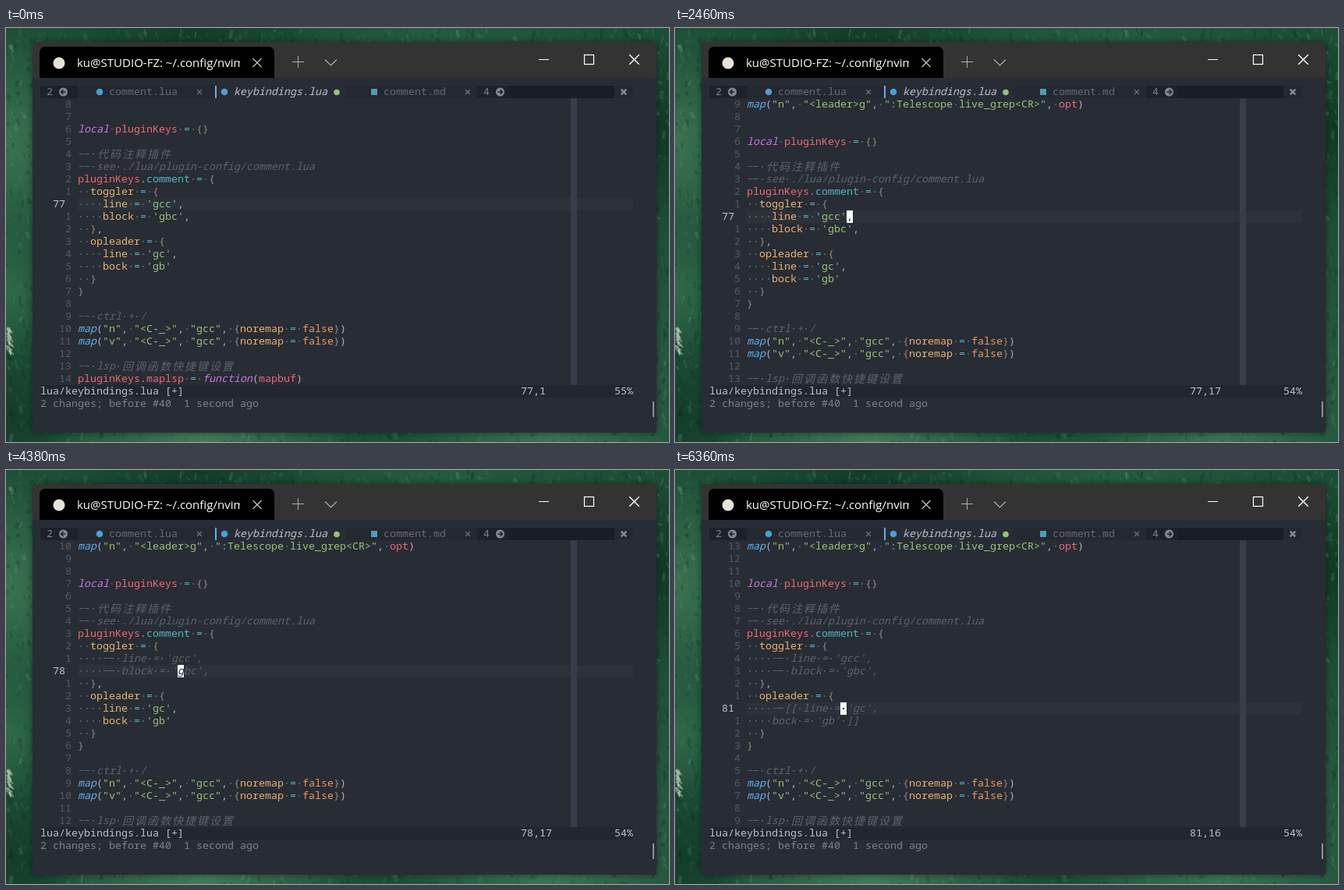
An HTML page with a canvas for the animation above (8000 ms loop, 850 px wide and 531 px high).

```html
<!DOCTYPE html>
<html lang="en">
<head>
<meta charset="utf-8">
<title>Commenting code in a terminal editor</title>
<style>
html, body { margin: 0; width: 100%; height: 100%; overflow: hidden; background: #1d4f37; }
canvas { display: block; }
</style>
</head>
<body>
<canvas id="stage" width="850" height="531"></canvas>
<script>
const W = 850, H = 531, LOOP = 8000;
const CELL = 8, ROW = 16, TEXT_X = 92, TOP = 90, ROWS = 23;
const MONO = '13.333px "Noto Sans Mono", "DejaVu Sans Mono", monospace';
const CJK = 'italic 14px "Noto Sans CJK SC", "Noto Sans CJK", sans-serif';
const C = {
  bg: '#282c34', bar: '#22262d', fill: '#1a1d23', line: '#2c313a', column: '#373d49',
  text: '#abb2bf', bright: '#bbc2cf', dim: '#7c828d', number: '#535a67',
  comment: '#5c6370', dot: '#4e5b67',
  red: '#ec6a72', green: '#98c379', blue: '#61afef', cyan: '#56b6c2',
  purple: '#c678dd', yellow: '#e8b470', orange: '#e39d60', brace: '#978879'
};

const ctx = document.getElementById('stage').getContext('2d');

// time, line, column, pending keys
const steps = [
  [0, 77, 1, ''], [900, 76, 13, ''], [2460, 77, 17, ''],
  [2820, 77, 17, 'g'], [3030, 77, 17, 'gc'], [3240, 77, 17, 'g@i'],
  [3780, 77, 17, 'g@i{'], [3810, 77, 17, ''],
  [4380, 78, 17, ''], [4500, 79, 4, ''], [4650, 80, 14, ''], [4800, 81, 16, ''],
  [5310, 81, 16, 'g'], [5520, 81, 16, 'gb'], [5730, 81, 16, 'g@i'], [6360, 81, 16, '']
];
const SCROLL_AT = 900, LINES_AT = 3810, BLOCK_AT = 6360;

const FIRST = 68;
const source = `map("n", "<leader>g", ":Telescope live_grep<CR>", opt)


local pluginKeys = {}

-- 代码注释插件
-- see ./lua/plugin-config/comment.lua
pluginKeys.comment = {
  toggler = {
    line = 'gcc',
    block = 'gbc',
  },
  opleader = {
    line = 'gc',
    bock = 'gb'
  }
}

-- ctrl + /
map("n", "<C-_>", "gcc", {noremap = false})
map("v", "<C-_>", "gcc", {noremap = false})

-- lsp 回调函数快捷键设置
pluginKeys.maplsp = function(mapbuf)`.split('\n');

const wordColor = {};
const paint = (color, words) => words.split(' ').forEach(w => wordColor[w] = color);
paint(C.purple, 'local function');
paint(C.blue, 'map');
paint(C.red, 'pluginKeys opt mapbuf maplsp');
paint(C.cyan, 'comment =');
paint(C.yellow, 'toggler line block opleader bock noremap');
paint(C.orange, 'false');
paint(C.brace, '{ }');
const italicWords = ['local', 'function', 'map'];

function rect(x, y, w, h, color) {
  ctx.fillStyle = color;
  ctx.fillRect(x, y, w, h);
}

function text(str, x, y, color, italic) {
  ctx.font = (italic ? 'italic ' : '') + MONO;
  ctx.fillStyle = color;
  ctx.fillText(str, x, y);
}

function stroke(points, color, width = 1) {
  ctx.strokeStyle = color;
  ctx.lineWidth = width;
  ctx.beginPath();
  points.forEach(([x, y], i) => i ? ctx.lineTo(x, y) : ctx.moveTo(x, y));
  ctx.stroke();
}

function cross(x, y, r, color, width) {
  stroke([[x - r, y - r], [x + r, y + r]], color, width);
  stroke([[x - r, y + r], [x + r, y - r]], color, width);
}

function disc(x, y, r, color) {
  ctx.fillStyle = color;
  ctx.beginPath();
  ctx.arc(x, y, r, 0, Math.PI * 2);
  ctx.fill();
}

function arrowDisc(x, y, dir) {
  disc(x, y, 5.5, '#858b95');
  stroke([[x - 3 * dir, y], [x + 3 * dir, y]], C.fill, 1.5);
  stroke([[x, y - 3], [x + 3 * dir, y], [x, y + 3]], C.fill, 1.5);
}

function glow(x, y, r, color) {
  const g = ctx.createRadialGradient(x, y, 0, x, y, r);
  g.addColorStop(0, color);
  g.addColorStop(1, color + '00');
  rect(x - r, y - r, 2 * r, 2 * r, g);
}

function wallpaper() {
  let seed = 7;
  const rnd = () => (seed = seed * 16807 % 2147483647) / 2147483647;
  rect(0, 0, W, H, '#1d4f37');
  glow(0, 150, 150, '#3a7350');
  glow(0, 335, 90, '#2f6a48');
  glow(10, 500, 100, '#143c2a');
  glow(240, 0, 170, '#123c2a');
  glow(560, 0, 200, '#255b40');
  glow(850, 130, 130, '#0f3928');
  glow(850, 400, 150, '#24593f');
  glow(250, 531, 200, '#437a58');
  glow(700, 531, 190, '#3c7353');
  const tones = ['#0a2e1f', '#113b29', '#2f6b4a', '#3d7955', '#5f9470'];
  for (let i = 0; i < 4200; i++) {
    const x = rnd() * W, y = rnd() * H, len = 2 + rnd() * 10;
    ctx.globalAlpha = 0.12 + rnd() * 0.25;
    stroke([[x, y], [x + rnd() * 8 - 3, y + len]], tones[Math.floor(rnd() * 5)], 1 + rnd() * 4);
  }
  ctx.globalAlpha = 0.5;
  for (let i = 0; i < 26; i++) {
    const y = 383 + rnd() * 32;
    stroke([[rnd() * 5, y], [3 + rnd() * 7, y + 6]], '#b9cdb4', 2);
  }
  ctx.globalAlpha = 1;
}

function titleBar() {
  rect(34, 18, 800, 46, '#333333');
  ctx.fillStyle = '#000';
  ctx.beginPath();
  ctx.roundRect(43, 24, 301, 40, [7, 7, 0, 0]);
  ctx.fill();
  disc(68, 45, 7.5, '#e6e2d6');
  ctx.save();
  ctx.beginPath();
  ctx.rect(90, 28, 210, 32);
  ctx.clip();
  ctx.font = '15px "Open Sans", "Noto Sans", sans-serif';
  ctx.fillStyle = '#fff';
  ctx.fillText('ku@STUDIO-FZ: ~/.config/nvim', 91, 50);
  ctx.restore();
  cross(322, 44.5, 5.5, '#c4c4c4', 1.2);
  stroke([[367, 43.5], [382, 43.5]], '#b0b0b0');
  stroke([[374.5, 36], [374.5, 51]], '#b0b0b0');
  stroke([[409, 40.5], [416.5, 48], [424, 40.5]], '#b0b0b0', 1.2);
  stroke([[683, 40.5], [696, 40.5]], '#fff');
  ctx.strokeStyle = '#fff';
  ctx.lineWidth = 1.2;
  ctx.strokeRect(741.5, 34.5, 12, 12);
  cross(805.5, 40.5, 6.3, '#fff', 1.4);
}

function bufferTabs() {
  const y = 86, mid = 82;
  rect(44, 74, 760, ROW, '#24282f');
  rect(44, 74, 48, ROW, '#1e2228');
  rect(268, 74, 168, ROW, C.bg);
  rect(604, 74, 41, ROW, '#1e2228');
  rect(645, 74, 135, ROW, C.fill);
  rect(268, 74, 2, ROW, C.blue);
  text('2', 52, y, C.dim);
  arrowDisc(73.5, mid, -1);
  disc(120, mid, 4.3, '#4b9fd5');
  text('comment.lua', 132, y, '#646b77');
  cross(248, mid, 3, '#6b727e', 1.3);
  disc(280, mid, 4.3, '#4b9fd5');
  text('keybindings.lua', 292, y, C.bright, true);
  disc(424, mid + 0.5, 3.8, C.green);
  rect(468, 78, 8, 8, '#519aba');
  text('comment.md', 484, y, '#646b77');
  cross(592, mid, 3, '#6b727e', 1.3);
  text('4', 612, y, C.dim);
  arrowDisc(633.5, mid, 1);
  cross(792, mid, 3.3, '#858b95', 2.4);
}

function codeLine(n, time) {
  const line = source[n - FIRST];
  if (time >= LINES_AT && (n === 77 || n === 78)) return '    -- ' + line.trim();
  if (time >= BLOCK_AT && n === 81) return '    --[[ ' + line.trim();
  if (time >= BLOCK_AT && n === 82) return line + ' ]]';
  return line;
}

function drawCode(line, y) {
  const isComment = /^\s*--|\]\]$/.test(line);
  const pattern = isComment ? /--|[\u4e00-\u9fff]|[^\s\u4e00-\u9fff]+?(?=--|\s|$|[\u4e00-\u9fff])|\s/g
                            : /"[^"]*"|'[^']*'|\w+|\s|./g;
  let x = TEXT_X;
  for (const token of line.match(pattern) || []) {
    if (/[\u4e00-\u9fff]/.test(token)) {
      ctx.font = CJK;
      ctx.fillStyle = C.comment;
      ctx.fillText(token, x + 1, y + 0.5);
      x += 2 * CELL;
      continue;
    }
    if (isComment && token === '--') {
      rect(x + 2, y - 5, 5, 1, C.comment);
      rect(x + 8, y - 5, 7, 1, C.comment);
    } else {
      const color = isComment ? C.comment
        : /^["']/.test(token) ? C.green : wordColor[token] || C.text;
      text(token, x, y, color, isComment || italicWords.includes(token));
    }
    [...token].forEach((ch, i) => {
      if (ch === ' ') rect(x + i * CELL + 3, y - 5, 2, 2, C.dot);
    });
    x += token.length * CELL;
  }
}

function drawCursor(line, col, y, pending) {
  const x = TEXT_X + (col - 1) * CELL;
  if (pending) return rect(x, y + ROW - 2, CELL, 2, '#fff');
  rect(x, y, CELL, ROW, '#fff');
  const ch = line[col - 1];
  if (ch === ' ') rect(x + 3, y + 7, 2, 2, C.bg);
  else text(ch, x, y + 12, C.bg, /^\s*--/.test(line));
}

function editor(time) {
  const [, current, col, keys] = steps.filter(s => s[0] <= time).pop();
  const scrolled = time >= SCROLL_AT;
  const first = FIRST + (scrolled ? 0 : 1);
  const cursorY = TOP + (current - first) * ROW;
  rect(TEXT_X, cursorY, 712, ROW, C.line);
  rect(724, TOP, CELL, ROWS * ROW, C.column);

  for (let row = 0; row < ROWS; row++) {
    const n = first + row, y = TOP + row * ROW + 12;
    if (n === current) {
      text(String(n), 60, y, C.bright);
    } else {
      const label = String(Math.abs(n - current));
      text(label, 84 - label.length * CELL, y, C.number);
    }
    drawCode(codeLine(n, time), y);
  }
  if (scrolled) drawCursor(codeLine(current, time), col, cursorY, keys.startsWith('g@'));

  rect(44, 458, 760, ROW, C.bar);
  text('lua/keybindings.lua [+]', 44, 470, C.bright);
  text(current + ',' + col, 660, 470, C.bright);
  text(scrolled ? '54%' : '55%', 780, 470, C.bright);
  text('2 changes; before #40  1 second ago', 44, 486, C.dim);
  text(keys, 716, 502, C.dim);
}

function makeBackdrop() {
  wallpaper();
  ctx.save();
  ctx.shadowColor = 'rgba(0,0,0,.45)';
  ctx.shadowBlur = 8;
  rect(34, 18, 800, 501, C.bg);
  ctx.restore();
  titleBar();
  bufferTabs();
  rect(829, 479, 2, 20, '#8d9096');
  const copy = document.createElement('canvas');
  copy.width = W;
  copy.height = H;
  copy.getContext('2d').drawImage(ctx.canvas, 0, 0);
  return copy;
}

const backdrop = makeBackdrop();
const start = performance.now();

function frame() {
  ctx.drawImage(backdrop, 0, 0);
  editor((performance.now() - start) % LOOP);
  requestAnimationFrame(frame);
}
frame();
</script>
</body>
</html>
```
